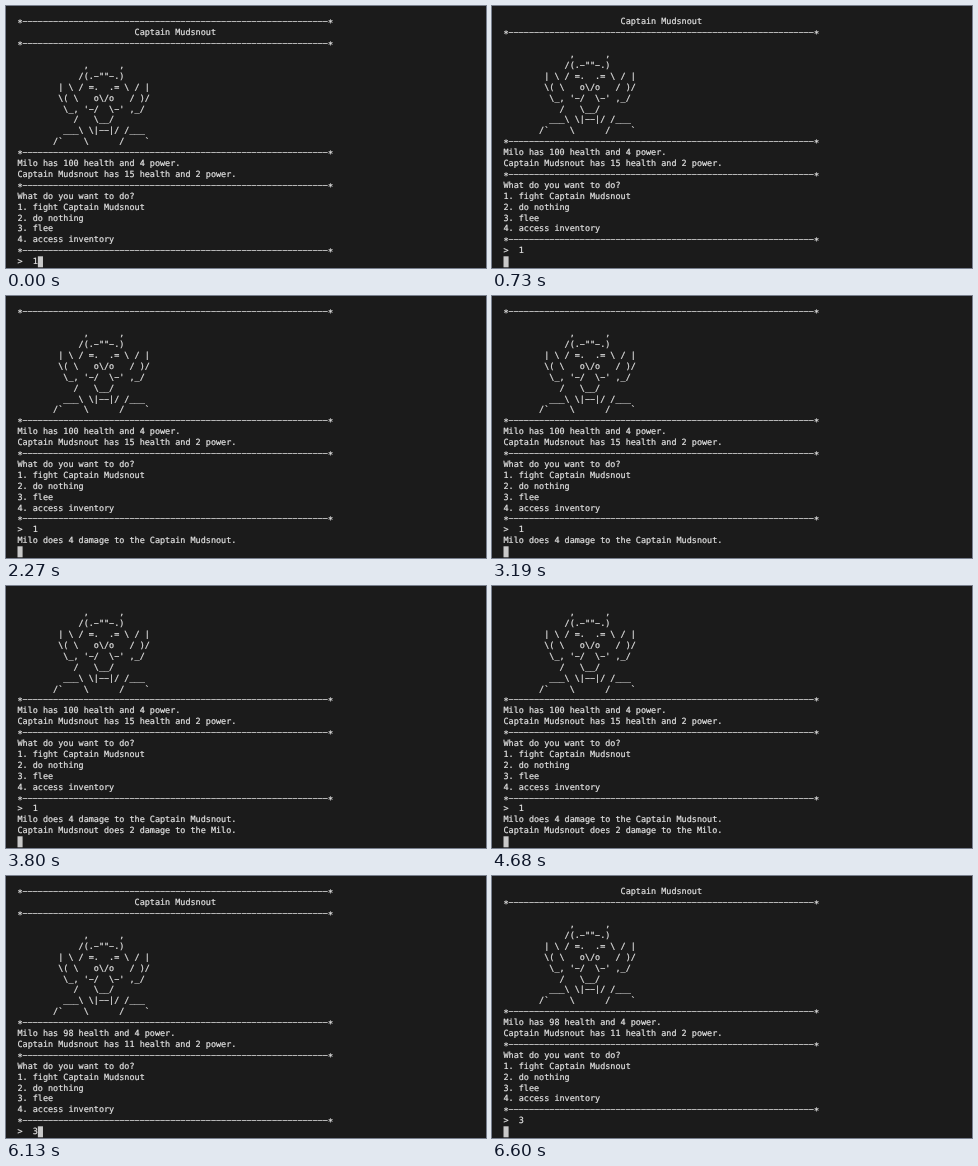
Recreate the animation shown at these times as an HTML page. Size 480x262 px, loop 8000 ms.

```html
<!DOCTYPE html>
<html lang="en">
<head>
<meta charset="utf-8">
<title>Terminal battle</title>
<style>
  html, body { margin: 0; width: 100%; height: 100%; overflow: hidden; background: #1b1b1b; }
  svg { display: block; width: 480px; height: 262px; }
  text {
    font: 8.46px "DejaVu Sans Mono", "Liberation Mono", monospace;
    fill: #e2e2e2;
    stroke: #e2e2e2;
    stroke-width: .22px;
    white-space: pre;
    font-variant-ligatures: none;
    text-rendering: geometricPrecision;
  }
</style>
</head>
<body>
<svg viewBox="0 0 480 262" xmlns="http://www.w3.org/2000/svg">
  <rect width="480" height="262" fill="#1b1b1b"/>
  <rect id="cursor" width="5.1" height="11" fill="#c9c9c9"/>
  <g id="screen"></g>
</svg>
<script>
const ROWS = 23, LEFT = 11.5, BASE = 18.3, PITCH = 10.9, CHAR = 5.093;
const LOOP = 8000;
const HERO = "Milo", FOE = "Captain Mudsnout";

const rule = "*" + "-".repeat(60) + "*";
const art = String.raw`
             ,      ,
            /(.-""-.)
        | \ / =.  .= \ / |
        \( \   o\/o   / )/
         \_, '-/  \-' ,_/
           /   \__/
         ___\ \|--|/ /___`.split("\n");
art.push("       /`    \\      /    `");

const stats = (name, health, power) => `${name} has ${health} health and ${power} power.`;
const hit = (from, damage, to) => `${from} does ${damage} damage to the ${to}.`;

// Wide dash and low asterisk, as the terminal's typeface draws them.
const glyphs = text => text.replaceAll("-", "\u2212").replaceAll("*", "\u2217");

function menu(heroHealth, foeHealth) {
  return [
    rule, " ".repeat(23) + FOE, rule,
    ...art,
    rule, stats(HERO, heroHealth, 4), stats(FOE, foeHealth, 2), rule,
    "What do you want to do?",
    "1. fight " + FOE, "2. do nothing", "3. flee", "4. access inventory",
    rule
  ];
}

const first = menu(100, 15), second = menu(98, 11);
const blow = hit(HERO, 4, FOE), reply = hit(FOE, 2, HERO);

// Start time and full output; the last line holds the cursor.
const steps = [
  [0, [...first, ">  1"]],
  [730, [...first, ">  1", ""]],
  [2270, [...first, ">  1", blow, ""]],
  [3800, [...first, ">  1", blow, reply, ""]],
  [5270, [...second, ">  "]],
  [6130, [...second, ">  3"]],
  [6600, [...second, ">  3", ""]]
];

const screen = document.getElementById("screen");
const cursor = document.getElementById("cursor");
const lines = Array.from({ length: ROWS }, (_, row) => {
  const line = document.createElementNS("http://www.w3.org/2000/svg", "text");
  line.setAttribute("x", LEFT);
  line.setAttribute("y", BASE + row * PITCH);
  return screen.appendChild(line);
});

let shown = null;

function draw(time) {
  const step = steps.findLast(([start]) => start <= time);
  if (step === shown) return;
  shown = step;
  const view = step[1].slice(-ROWS);
  lines.forEach((line, row) => { line.textContent = glyphs(view[row] ?? ""); });
  const last = view.length - 1;
  cursor.setAttribute("x", LEFT + view[last].length * CHAR);
  cursor.setAttribute("y", BASE + last * PITCH - 7.8);
}

function tick(now) {
  draw(now % LOOP);
  requestAnimationFrame(tick);
}

draw(0);
requestAnimationFrame(tick);
</script>
</body>
</html>
```
